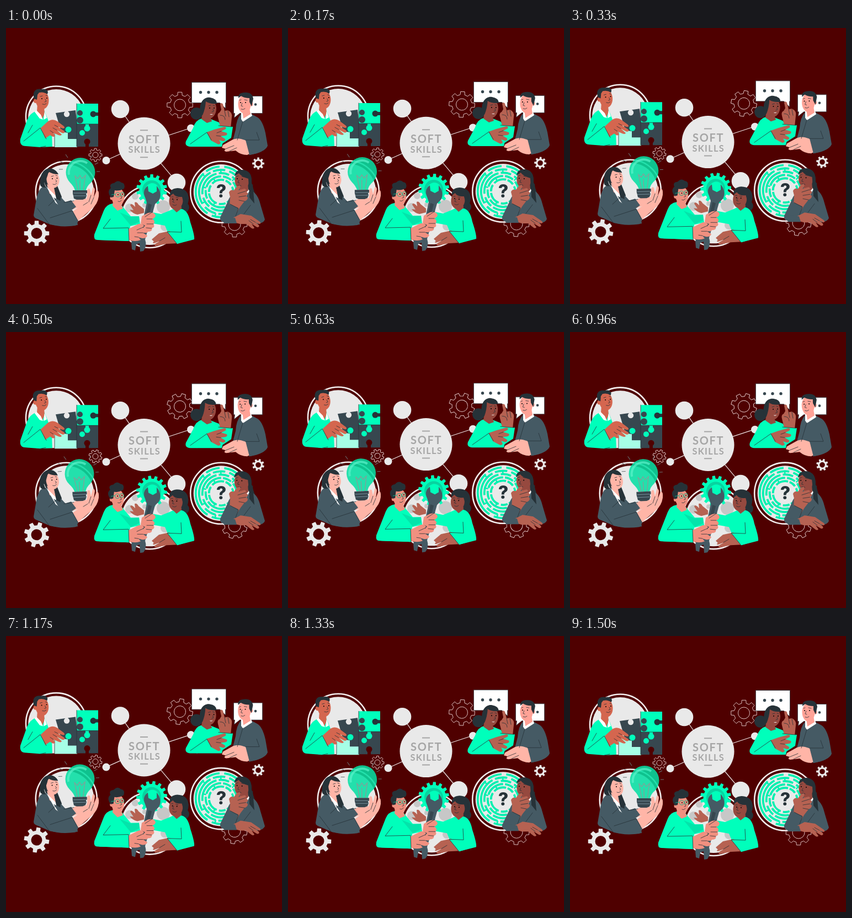
Recreate the animation shown at these times as an HTML page. Size 500 px wide and 500 px high, loop 1540 ms.

```html
<!DOCTYPE html>
<html lang="en">
<head>
<meta charset="utf-8">
<title>Soft skills</title>
<style>
html, body { margin: 0; width: 100%; height: 100%; overflow: hidden; background: #4f0000; }
svg { display: block; width: 100vw; height: 100vh; }
.green { fill: #00ffbb; }
.shade { fill: #08d3a0; }
.mint { fill: #a6ffe6; }
.slate { fill: #455a64; }
.dark { fill: #37474f; }
.hair { fill: #263238; }
.pink { fill: #ffb5a7; }
.rose { fill: #ffa296; }
.coral { fill: #f09080; }
.tan { fill: #d4664f; }
.clay { fill: #b66252; }
.brown { fill: #96493f; }
.grey { fill: #e9e9e9; }
.white { fill: #fff; }
.bg { fill: #4f0000; }
.ink { fill: none; stroke: #263238; stroke-width: .8; stroke-linecap: round; stroke-linejoin: round; }
.wire { fill: none; stroke: #e9d5d5; stroke-width: .9; }
.ring { fill: none; stroke: #f2ecec; stroke-width: 2.6; }
.link { stroke: #ebe4e4; stroke-width: 1.2; }
text { font-family: Lato, "Open Sans", sans-serif; font-weight: 700; text-anchor: middle; }
.ask { font-family: Inter, sans-serif; font-weight: 800; font-size: 32px; }
</style>
</head>
<body>
<svg viewBox="0 0 500 500">
<g id="scene">
  <!-- hub -->
  <path class="link" d="M250 209 207 147M250 209 335 181M250 209 181 240M250 209 309 279"/>
  <g class="grey">
    <circle cx="207" cy="147" r="16.3"/><circle cx="335" cy="181.500" r="7"/>
    <circle cx="181.500" cy="240" r="7"/><circle cx="309" cy="280" r="16.300"/>
    <circle cx="250" cy="209.300" r="47.500"/>
  </g>
  <g fill="#a6a6a6">
    <path d="M243 184.300h14v2h-14zM243 233.200h14v2h-14z"/>
    <text x="250.700" y="209" font-size="20" letter-spacing="1.700">SOFT</text>
    <text x="250.700" y="226.500" font-size="16.300" letter-spacing="1.300">SKILLS</text>
  </g>

  <!-- gears -->
  <g id="gears"></g>

  <!-- teamwork -->
  <g>
    <circle class="ring" cx="91" cy="160.500" r="55" pathLength="100" stroke-dasharray="73 27" stroke-dashoffset="-37"/>
    <path class="grey" d="M91 111a51 51 0 0 1 36 87v17H55V198A51 51 0 0 1 91 111z"/>
    <path class="mint" d="M88 180h41v36H88z"/>
    <path class="green" d="M128 137h39v37h-39z"/>
    <path class="dark" d="M128 174h39v41h-39z"/>
    <circle class="green" cx="147" cy="182" r="5.500"/><path class="green" d="M144 173h6v6h-6z"/>
    <circle class="hair" cx="158" cy="156" r="5.500"/><path class="hair" d="M161 153h6v6h-6z"/>
    <circle class="bg" cx="147" cy="206" r="5.500"/><path class="bg" d="M144 208h6v8h-6z"/>
    <g class="dark">
      <path d="M90 154 126 149 130 185 113 190 100 188z"/>
      <circle cx="134" cy="167" r="6"/>
      <path d="M112 178h17v23h-17z"/>
    </g>
    <circle class="grey" cx="110" cy="156" r="5.200"/>
    <path class="grey" d="m107 151 5-1 1 5h-5z"/>
    <circle class="green" cx="113" cy="184" r="5.500"/>
    <circle class="green" cx="138" cy="190" r="5"/>
    <circle class="dark" cx="134" cy="154" r="5"/>
    <path class="ink" d="M128 137v78M128 174h39M88 215V180"/>
    <path class="green" d="M57 150C46 153 41 159 37 170L26 201Q24 214 36 214L62 216 84 215 83 190 76 166 70 151z"/>
    <path class="tan" d="M57 137 69 143 70 155 66 164 56 151z"/>
    <path class="white" d="m55 149 8 8 4 9-6-2-9-12zM70 151l4 12-6 3 1-9z"/>
    <g class="sway" data-o="62 148">
      <ellipse class="tan" cx="65.500" cy="130" rx="12" ry="17" transform="rotate(-5 65.500 130)"/>
      <circle class="tan" cx="54" cy="132" r="4"/>
      <path class="hair" d="M51 128C47 115 54 109 64 111Q74 109 76 116L75 120Q68 115 60 117L57 121 56 130z"/>
      <circle cx="65" cy="128" r="1"/><circle cx="74" cy="127" r="1"/>
      <path class="ink" d="m62 124 4-1M72 122l3 1M71 129l2 4-3 1M66 138q4 2 7-1"/>
    </g>
    <path class="green" d="M30 203 62 180 73 202 40 214z"/>
    <path class="tan" d="M63 181 75 170Q84 163 93 169L105 178Q108 182 103 182L94 179 106 187Q107 192 101 190L92 185 101 193Q100 196 95 194L86 190 89 196Q85 199 80 194L71 200z"/>
    <path class="ink" d="M32 205 62 181 73 201M40 190l8-14M94 179l-6-3M92 185l-7-4M86 190l-6-4M62 216l10-2"/>
  </g>

  <!-- creativity -->
  <g>
    <circle class="ring" cx="109.300" cy="297" r="55.500"/>
    <circle class="grey" cx="109.300" cy="297" r="50"/>
    <path class="hair" d="M66 273C61 256 82 248 92 261L93 286 101 306 97 321 82 308z"/>
    <path class="slate" d="M66 288Q58 293 55 310L50 339Q50 344 57 346L80 356Q105 361 130 357L128 342 112 320 100 307 80 286z"/>
    <path class="pink" d="m74 283 13 5 4 19-12-7z"/>
    <path class="white" d="m73 287 17 17 7 3 3 17-10-7z"/>
    <path class="hair" d="m87 289 12 14-1 19-7-13z"/>
    <g class="sway" data-o="80 292">
      <ellipse class="pink" cx="85" cy="274.500" rx="11.500" ry="15.500" transform="rotate(-8 85 274.500)"/>
      <path class="hair" d="M77 260Q75 272 69 280L72 289Q59 290 62 276C62 254 87 248 95 265Q84 265 77 260z"/>
      <circle cx="84" cy="273" r="1"/><circle cx="92.500" cy="272" r="1"/>
      <path class="ink" d="m82 269 4-1M90 267l3 1M90 275l2 3-2 1M85 283q4 2 7-2"/>
    </g>
    <path class="pink" d="M113 319 126 311 145 309 149 314 138 323 120 329z"/>
    <path class="slate" d="m86 307 19 9 13-4 9 12-21 15z"/>
    <g class="sway" data-o="134 310">
      <path d="M125 294Q123 287 116 280A26.500 26.500 0 1 1 154 280Q146 287 145 294z" fill="#06dfa4" opacity=".87"/>
      <path d="M114 266a21 21 0 0 1 33-21" fill="none" stroke="#5cf3cb" stroke-width="4" opacity=".7"/>
      <path d="M130 294 125 268 130 273 134 267 138 273 144 267 140 294M134 294V276" fill="none" stroke="#849f98" stroke-width="1.300"/>
      <path class="dark" d="M121 294h26v5l-2 1 1 4-2 5-5 2h-11l-5-2-1-5-1-4z"/>
      <path d="M122 299h23M122 304h23" stroke="#78909c"/>
      <path d="m104 244-7-3M103 256h-7M112 235l-4-6M164 260h6M161 247l6-3M153 236l4-6" stroke="#687274" stroke-width="1"/>
    </g>
    <path class="pink" d="M120 333 139 319Q149 310 147 296 148 289 152 292L154 302 157 290Q160 287 161 293L159 307 164 294Q169 293 168 305 166 319 156 327L130 350z"/>
    <path class="slate" d="M79 355 84 342 120 330 131 350 126 358Q98 362 79 355z"/>
    <path class="ink" d="m57 327 21 28M80 344l40-13 10 18M90 310l-13 12M105 316l18-3M154 303l-4 12M159 307l-5 12M148 316l-8 5"/>
  </g>

  <!-- communication -->
  <g>
    <path d="M336.500 98.500h62v37h-1v10l-10-10h-51z" fill="#fff" stroke="#37474f" stroke-width=".8"/>
    <path d="M412.500 123.500h52v31h-41l-10 8 1-8h-2z" fill="#fff" stroke="#37474f" stroke-width=".8"/>
    <g class="dark"><circle cx="352.500" cy="116.500" r="2.700"/><circle cx="367" cy="116.500" r="2.700"/><circle cx="382" cy="116.500" r="2.700"/><circle cx="452" cy="138.500" r="2.300"/></g>
    <path class="slate" d="M426 155Q417 165 416 184L410 207 441 230Q468 226 474 213L470 190Q465 168 456 162L443 155z"/>
    <path class="white" d="m426 153 18 0 2 6-17 11-3-5z"/>
    <path class="rose" d="m428 148 13-3 2 11-13 8z"/>
    <g class="sway" data-o="436 156">
      <ellipse class="rose" cx="432" cy="138" rx="11.500" ry="17"/>
      <circle class="rose" cx="444" cy="138" r="3.600"/>
      <path class="hair" d="M421 127Q420 118 430 117 446 115 448 128L445 142 441 134 441 127Q431 127 426 123z"/>
      <circle cx="425" cy="135" r="1"/><circle cx="434" cy="135" r="1"/>
      <path class="ink" d="m423 131 3-1M432 130l5 1M428 136l-2 5 3 1M426 147q4 2 7-1"/>
    </g>
    <path class="pink" d="M393 212 411 202Q418 199 426 201L442 206 444 226 437 230Q425 230 416 222L399 224Q393 223 398 219L391 217z"/>
    <path class="slate" d="m434 203 25 2 15 8Q471 224 441 230z"/>
    <path class="ink" d="m429 169-10 34M434 203l25 0-5-14M398 219l15-6M405 223l13-6"/>
    <circle class="hair" cx="345" cy="155" r="11"/>
    <path class="green" d="M354 164Q343 167 339 181L326 205Q323 214 334 215L391 215 396 194 386 171 371 165z"/>
    <path class="brown" d="m356 153 13 5 4 11-9 3-10-7z"/>
    <g class="sway" data-o="362 165">
      <ellipse class="brown" cx="368.500" cy="147" rx="12.500" ry="17" transform="rotate(5 368.500 147)"/>
      <path class="hair" d="M352 157C348 132 361 124 370 126Q382 128 382 137 369 138 362 133 361 147 356 158z"/>
      <circle cx="369" cy="145" r="1"/><circle cx="377" cy="145" r="1"/>
      <path class="ink" d="m367 141 4-1M375 140l3 1M375 147l1 4-3 1"/>
      <path d="M369 156q3 2 6 0z" fill="#fff"/>
    </g>
    <path class="clay" d="M388 178 384 162Q382 155 387 153L390 148 388 138Q390 134 393 138L396 150 402 149Q411 153 409 162L407 181z"/>
    <path class="green" d="m386 177 25 2-3 20-17 11z"/>
    <path class="clay" d="m363 189 14-5 18-5q5 0 3 4l-8 4 10 3q2 4-3 5l-8 1 8 5q1 4-4 4l-7-2 3 5q-2 4-6 2l-13-7z"/>
    <path class="green" d="m328 207 35-19 9 17-26 10z"/>
    <path class="ink" d="m334 210 30-21 8 14M385 177l24 2M388 158q9 0 9 8M402 150l2 11M396 150l2 10M390 187l-8 3M389 196l-8-1"/>
  </g>

  <!-- problem solving -->
  <g>
    <circle class="ring" cx="260" cy="342" r="56"/>
    <circle class="grey" cx="260" cy="342" r="51"/>
    <g fill="#c7c7c7"><circle cx="224" cy="326" r="8"/><circle cx="285" cy="324" r="12"/><circle cx="234" cy="305" r="6"/><circle cx="288" cy="360" r="8"/><circle cx="251" cy="321" r="4"/></g>
    <g id="cog"></g>
    <circle class="shade" cx="264" cy="293" r="17"/>
    <circle class="green" cx="265" cy="293" r="12"/>
    <circle class="hair" cx="323" cy="325" r="9"/>
    <path class="clay" d="M250 335 238 338Q229 336 224 329L231 330 225 321Q226 317 231 321L234 324 233 316Q237 314 240 320L250 328z"/>
    <path class="green" d="M193 318Q181 320 177 331L160 374Q158 384 166 384L223 386 225 359 243 355 241 341 226 341 210 322z"/>
    <path class="shade" d="m206 334 20 8 15-1 1 10-16 7z" opacity=".6"/>
    <path class="coral" d="m194 312 14 6 4 9-10 4-9-9z"/>
    <path class="green" d="M307 326Q294 332 281 337L260 333 251 342 266 354 288 358 296 377 310 391 341 383Q342 376 334 352 330 331 319 328z"/>
    <path class="brown" d="m303 319 14-5 1 13-9 7-7-7z"/>
    <g class="sway" data-o="202 323">
      <ellipse class="coral" cx="203" cy="306" rx="11.500" ry="16"/>
      <circle class="coral" cx="192" cy="308" r="3.500"/>
      <path class="hair" d="M190 307Q182 296 190 290 186 282 196 281 203 274 209 280 217 281 214 291 205 296 197 294L195 306z"/>
      <g fill="none" stroke="#08b58c" stroke-width=".9">
        <path d="M191 302l7-1"/><circle cx="202.500" cy="302" r="4"/><circle cx="211" cy="301" r="3.500"/>
      </g>
      <circle cx="203" cy="302" r="1"/><circle cx="211" cy="301" r="1"/>
      <path class="ink" d="m208 304 2 4-3 1M203 314q4 2 6-2"/>
    </g>
    <g class="sway" data-o="311 326">
      <path class="hair" d="M298 304Q295 291 311 290 330 291 331 308 331 321 323 330L310 312z"/>
      <ellipse class="brown" cx="308" cy="313" rx="12.500" ry="16" transform="rotate(8 308 313)"/>
      <path class="hair" d="M297 304Q296 291 311 291 326 292 326 310L321 314 319 306Q307 307 303 300z"/>
      <circle cx="302" cy="310" r="1"/><circle cx="310" cy="311" r="1"/>
      <path class="ink" d="m300 306 3 0M308 307l4 1M304 311l-2 4 3 1M302 320q4 3 7 0"/>
    </g>
    <path class="slate" d="M257 286Q246 294 252 307L255 316 242 376Q229 380 227 389L228 401 234 403 236 392 242 390 243 405 249 404Q256 395 252 383L270 319 277 312Q284 300 273 286L273 296 266 300 258 296z"/>
    <path class="dark" d="m258 318 6 2-15 58-5-2z"/>
    <path class="coral" d="M246 341 257 335Q269 332 271 340 270 344 265 346 272 350 267 355 271 360 264 363 266 369 256 369L245 366 252 358 244 354z"/>
    <path class="coral" d="M222 364 240 355Q248 353 250 359L246 362 256 362Q261 367 255 371L248 371 256 376Q255 381 247 381L240 379 244 384Q234 388 222 384z"/>
    <path class="green" d="m165 366 57-5 1 25-54-2z"/>
    <path class="clay" d="m264 383 13-11 18-4 12 6 4 16-20 1-20 4q-5-1 1-5l7-4-11 4q-4-1 0-3z"/>
    <path class="green" d="m292 369 25 3 23 10-30 9z"/>
    <path class="ink" d="m189 346-13 17 46-1 1 24M265 346l-10 0M267 355h-12M264 363l-10-1M246 362l-9 4M248 371h-10M240 379l-7-1M317 350l1 20-26-1 17 21M278 386l10-6M266 333l-14 9"/>
  </g>

  <!-- critical thinking -->
  <g>
    <circle class="ring" cx="389.700" cy="297" r="55.500"/>
    <circle class="grey" cx="389.700" cy="297" r="50"/>
    <g id="maze" fill="none"></g>
    <circle class="grey" cx="389.700" cy="297" r="17.500"/>
    <text class="hair ask" x="390" y="307.500">?</text>
    <path class="hair" d="M419 267Q422 254 433 258 446 263 445 282L451 300 427 304 421 285z"/>
    <path class="slate" d="M424 291Q406 300 401 316L388 343Q387 351 395 352L456 355Q467 353 469 347L461 320Q456 299 444 295z"/>
    <path class="white" d="m424 291 12-3 5 7-10 17-6-8z"/>
    <path class="brown" d="m425 283 13-4 1 15-8 8-7-8z"/>
    <path class="hair" d="m440 276 7 8 3 34-9-11z"/>
    <g class="sway" data-o="431 292">
      <ellipse class="brown" cx="427.500" cy="276" rx="13" ry="16.500"/>
      <path class="hair" d="M414 268Q416 256 428 257 445 258 445 276L446 296 440 288 439 273Q427 270 422 263z"/>
      <circle cx="419" cy="273" r="1"/><circle cx="428" cy="274" r="1"/>
      <path class="ink" d="m417 269 4-1M427 269l4 1M422 276l-2 4 3 1M420 285q4-1 6 1"/>
    </g>
    <path class="clay" d="M405 323 406 306 404 298Q406 292 413 294L418 287 423 285Q426 287 423 291L421 294 432 291Q437 292 433 296L437 298Q440 301 435 304L438 307Q438 312 432 314L425 323 418 334z"/>
    <path class="slate" d="M388 344 406 319 421 326 412 350 396 354z"/>
    <path class="clay" d="m411 344 14-7 19 3 16 11q3 3-1 4l-7-3 6 5q2 4-3 4l-10-6 5 7q-2 3-6 0l-9-7-11 0-11-3z"/>
    <path class="slate" d="m391 341 24 3 3 10-23 0z"/>
    <path class="ink" d="m443 321-12 16M406 319l15 8-5 14M433 296l-13 4M435 304l-13 2M432 314l-10-2M452 352l-9-5M448 355l-8-6"/>
  </g>
</g>
</svg>
<script>
const LOOP = 1540, PEAK = 738, LIFT = 6, TILT = -3, TURN = 22;
const $ = id => document.getElementById(id);

function add(parent, tag, attrs) {
  const el = document.createElementNS('http://www.w3.org/2000/svg', tag);
  for (const k in attrs) el.setAttribute(k, attrs[k]);
  return parent.appendChild(el);
}

const circlePath = r => `M${r} 0A${r} ${r} 0 1 0 ${-r} 0A${r} ${r} 0 1 0 ${r} 0Z`;

function gearPath(r, root, hole, teeth) {
  const step = Math.PI * 2 / teeth, pts = [];
  const put = (rad, a) => pts.push((rad * Math.cos(a)).toFixed(2) + ' ' + (rad * Math.sin(a)).toFixed(2));
  for (let i = 0; i < teeth; i++) {
    const a = i * step - Math.PI / 2;
    put(root, a - step * .3);
    put(r, a - step * .2);
    put(r, a + step * .2);
    put(root, a + step * .3);
  }
  return 'M' + pts.join('L') + 'Z' + circlePath(hole);
}

const spinners = [];
function gear(parent, x, y, r, root, hole, teeth, cls) {
  const el = add(parent, 'path', { d: gearPath(r, root, hole, teeth), class: cls, 'fill-rule': 'evenodd' });
  spinners.push({ el, x, y });
}
gear($('gears'), 55.5, 372, 23, 17, 10, 8, 'grey');
gear($('gears'), 457, 245.5, 11, 8, 4.8, 8, 'grey');
gear($('gears'), 315, 139.5, 23.5, 18, 10.5, 8, 'wire');
gear($('gears'), 162, 230, 12, 9, 5, 8, 'wire');
gear($('gears'), 414, 356, 23, 18, 11, 8, 'wire');
gear($('cog'), 264, 293, 28, 22.5, 13, 14, 'green');

// Maze walls: broken rings joined by short spokes
const MX = 389.7, MY = 297;
for (let i = 0; i < 5; i++) {
  const r = 22 + i * 6;
  add($('maze'), 'circle', {
    cx: MX, cy: MY, r, stroke: '#00f0b0', 'stroke-width': 3.8, pathLength: 100,
    'stroke-dasharray': `${17 + i * 3} 2 9 3`, 'stroke-dashoffset': i * 13
  });
  for (let k = 0; k < 3 && i < 4; k++) {
    const a = k * 2.1 + i * 1.3, c = Math.cos(a), s = Math.sin(a);
    add($('maze'), 'path', {
      d: `M${MX + r * c} ${MY + r * s}l${6 * c} ${6 * s}`, stroke: '#00f0b0', 'stroke-width': 2.5
    });
  }
}

const sways = [...document.querySelectorAll('.sway')];

function draw(now) {
  const p = (1 + Math.cos((now % LOOP - PEAK) / LOOP * Math.PI * 2)) / 2;
  $('scene').setAttribute('transform', `translate(0 ${-LIFT * p})`);
  for (const el of sways) el.setAttribute('transform', `rotate(${TILT * p} ${el.dataset.o})`);
  for (const { el, x, y } of spinners) el.setAttribute('transform', `translate(${x} ${y}) rotate(${TURN * p})`);
  requestAnimationFrame(draw);
}
draw(performance.now());
</script>
</body>
</html>
```
